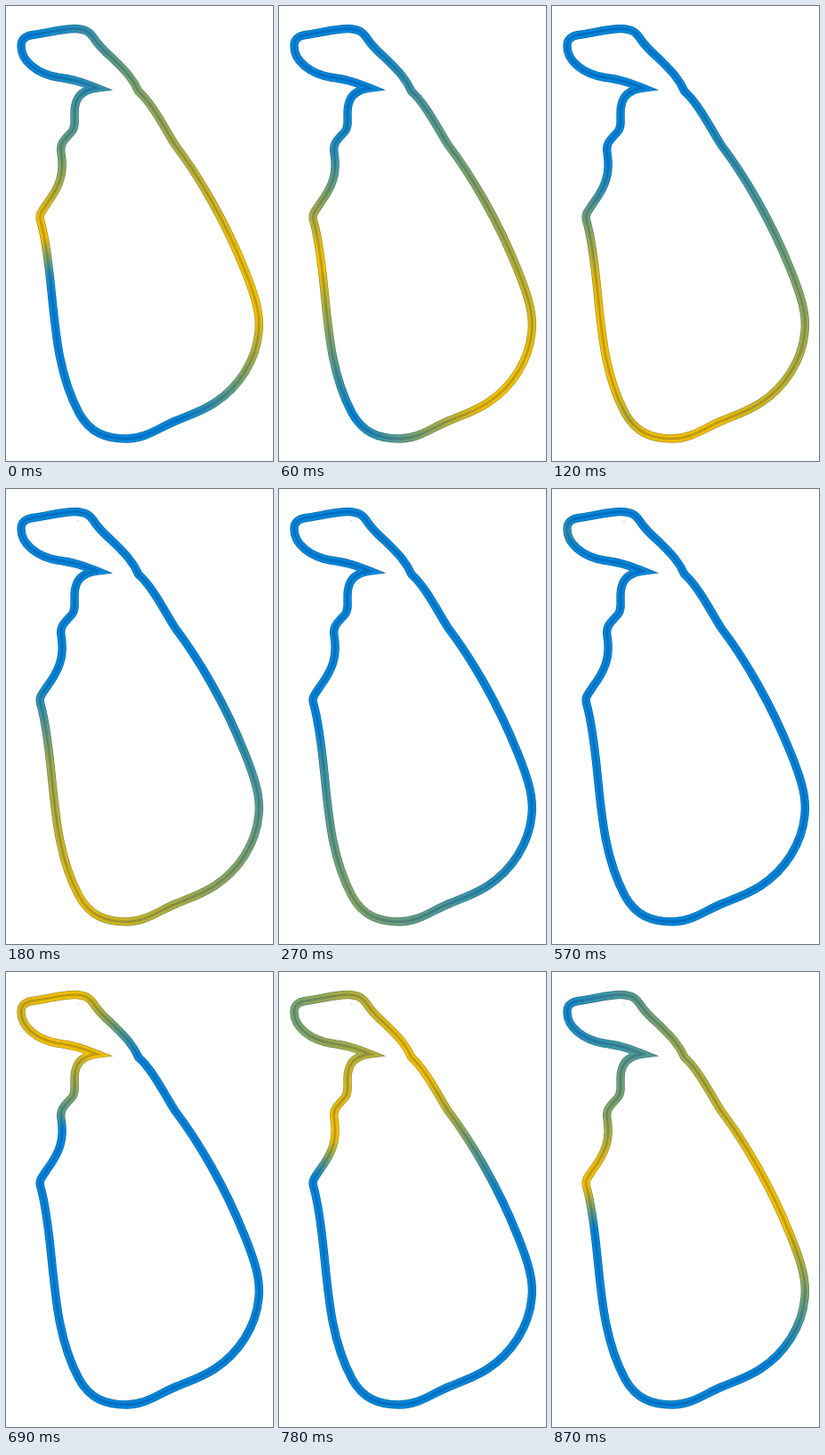
Recreate the animation shown at these times as an HTML page with a canvas. Size 300 px wide and 511 px high, loop 900 ms.

```html
<!DOCTYPE html>
<html lang="en">
<head>
<meta charset="utf-8">
<title>Island outline</title>
<style>
html, body { margin: 0; width: 100%; height: 100%; overflow: hidden; background: #fff; }
canvas { display: block; }
</style>
</head>
<body>
<canvas id="stage" width="300" height="511"></canvas>
<script>
const W = 300, H = 511, LOOP = 900, STEP = 30, START = 570;
const RISE = 75, DECAY = 220, LIFE = 255, PIECES = 360;
const BLUE = [0, 138, 226], YELLOW = [250, 196, 0];

// Centre line of the coast, clockwise from the north-west tip.
const COAST = `M17 45 C17 36 23 33 33 32 C48 30 65 25 78 25.5 C88 26 93 28 98 35
  C104 45 112 52 120 59 C132 71 142 80 149 96 C164 109 178 137 190 156
  C216 190 246 241 268 296 C281 328 286 347 284 366 C281 398 262 428 234 446
  C218 456 205 460 193 465 C172 473 158 486 135 486 C112 486 94 479 82 457
  C60 416 56 370 51 320 C48 290 44 260 39 242 C36 234 41 230 46 222
  C60 203 66 188 62 165 C60 154 66 150 74 141 C80 134 75 122 78 111
  C80 101 88 94 102 92.2 C82 84 72 82 58 80 C35 76 17 62 17 45 Z`;
const SPIKE = { x: 102, y: 92.2, at: 0.917 };

// Share of the coast and the time the glow peaks there; both arms meet in the south.
const ARRIVALS = [[0, 60], [0.14, 195], [0.597, 465], [0.728, 395], [0.848, 170], [1, 60]];

const lerp = (a, b, f) => a + (b - a) * f;
const clamp = v => Math.max(0, Math.min(1, v));

function arrival(share) {
  const n = Math.max(1, ARRIVALS.findIndex(([s]) => s >= share));
  const [s0, t0] = ARRIVALS[n - 1], [s1, t1] = ARRIVALS[n];
  return lerp(t0, t1, (share - s0) / (s1 - s0));
}

function colorAt(share, time) {
  const age = time - arrival(share);
  const glow = clamp(Math.min(1 + age / RISE, (LIFE - age) / DECAY));
  return `rgb(${BLUE.map((v, c) => Math.round(lerp(v, YELLOW[c], glow)))})`;
}

const outline = new Path2D(COAST);
const ruler = document.createElementNS('http://www.w3.org/2000/svg', 'path');
ruler.setAttribute('d', COAST);
const total = ruler.getTotalLength();
const points = Array.from({ length: PIECES + 1 }, (_, i) => ruler.getPointAtLength(total * i / PIECES));

const newLayer = () => Object.assign(document.createElement('canvas'), { width: W, height: H }).getContext('2d');
const ctx = document.getElementById('stage').getContext('2d');
const field = newLayer(), layer = newLayer();

// Broad colour strip, later cut to the width of each band.
function paintField(time) {
  field.clearRect(0, 0, W, H);
  field.fillStyle = colorAt(SPIKE.at, time);
  field.beginPath();
  field.arc(SPIKE.x, SPIKE.y, 22, 0, Math.PI * 2);
  field.fill();
  field.lineWidth = 16;
  for (let i = 0; i < PIECES; i++) {
    const a = points[i], b = points[i + 1];
    const dx = (b.x - a.x) / 2, dy = (b.y - a.y) / 2;
    field.strokeStyle = colorAt((i + 0.5) / PIECES, time);
    field.beginPath();
    field.moveTo(a.x - dx, a.y - dy);
    field.lineTo(b.x + dx, b.y + dy);
    field.stroke();
  }
}

function paintBand(width, shade) {
  layer.globalCompositeOperation = 'copy';
  layer.drawImage(field.canvas, 0, 0);
  layer.globalCompositeOperation = 'source-atop';
  layer.fillStyle = shade;
  layer.fillRect(0, 0, W, H);
  layer.globalCompositeOperation = 'destination-in';
  layer.lineWidth = width;
  layer.miterLimit = 10;
  layer.stroke(outline);
  ctx.drawImage(layer.canvas, 0, 0);
}

function draw(now) {
  const t = Math.floor((now % LOOP) / STEP) * STEP;
  paintField((t - START + LOOP) % LOOP);
  ctx.fillStyle = '#fff';
  ctx.fillRect(0, 0, W, H);
  paintBand(9.4, 'rgba(40,70,70,0.4)');
  paintBand(8, 'rgba(0,0,0,0.02)');
  paintBand(4, 'rgba(0,20,60,0.1)');
  paintBand(2, 'rgba(0,20,80,0.25)');
  ctx.fillStyle = '#999';
  ctx.fillRect(80.5, 35.5, 1, 1);
}

let origin;
function tick(now) {
  origin ??= now;
  draw(now - origin);
  requestAnimationFrame(tick);
}
draw(0);
requestAnimationFrame(tick);
</script>
</body>
</html>
```
